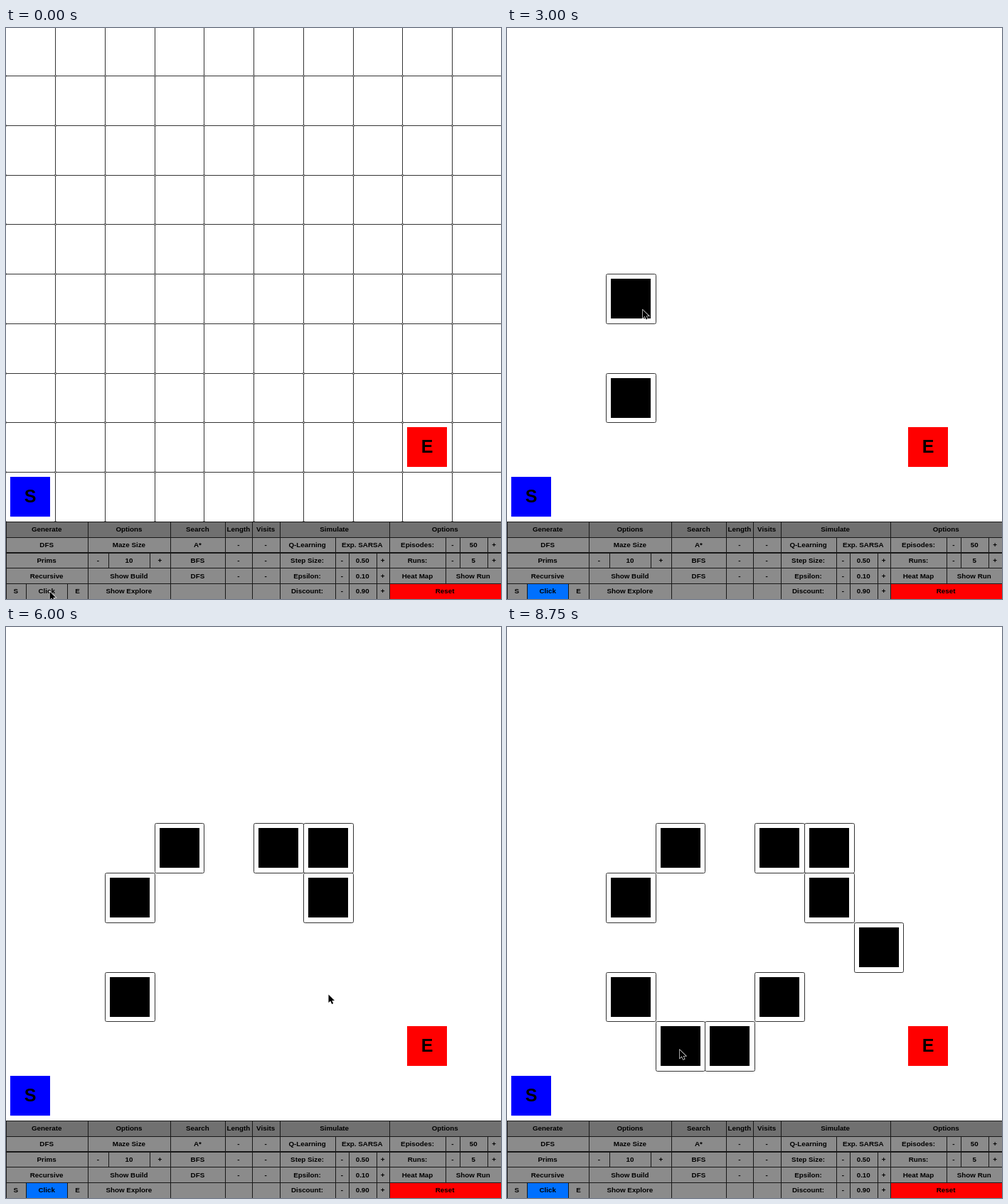
Write an HTML page that moves like this. It is 696x804 px and loops after 9.25 s.

```html
<!DOCTYPE html>
<html lang="en">
<head>
<meta charset="utf-8">
<title>Maze editor</title>
<style>
  html, body { margin: 0; width: 100%; height: 100%; overflow: hidden; background: #fff; }
  svg { display: block; width: 100%; height: 100%; }
  text { font-family: "Liberation Sans", Arial, sans-serif; font-weight: bold; font-kerning: none; text-anchor: middle; }
  .label { font-size: 9.8px; }
  .letter { font-size: 25px; }
</style>
</head>
<body>
<svg id="stage" viewBox="0 0 696 804"></svg>
<script>
const stage = document.getElementById("stage");
const LOOP = 9250, STEP = 250, START = 750;
const SIZE = 10, PITCH = 69.75;
const GREY = "#8b8b8b";

function add(parent, tag, attrs, text) {
  const el = document.createElementNS("http://www.w3.org/2000/svg", tag);
  for (const key in attrs) el.setAttribute(key, attrs[key]);
  if (text) el.textContent = text;
  parent.appendChild(el);
  return el;
}

const show = (el, on) => el.setAttribute("visibility", on ? "visible" : "hidden");
const edgeX = col => Math.floor(col * PITCH - 0.1);
const edgeY = row => Math.floor(row * PITCH - 2.2);

// A box whose one-pixel outline falls on whole pixels
function outline(parent, x, y, right, bottom, attrs) {
  return add(parent, "rect", {
    x: x + 0.5, y: y + 0.5, width: right - x, height: bottom - y, ...attrs
  });
}

function frame(parent, col, row) {
  outline(parent, edgeX(col), edgeY(row), edgeX(col + 1), edgeY(row + 1),
    { rx: 2, fill: "none", stroke: "#333" });
}

function tile(parent, col, row, fill, letter) {
  const x = edgeX(col) + 7, y = edgeY(row) + 7;
  add(parent, "rect", { x, y, width: 56, height: 56, fill });
  if (letter) add(parent, "text", { x: x + 28, y: y + 35.5, class: "letter" }, letter);
}

// Board
const grid = add(stage, "g", {});
for (let i = 0; i < SIZE * SIZE; i++) frame(grid, i % SIZE, Math.floor(i / SIZE));

// Walls: time, column, row
const walls = [
  [2250, 2, 7], [3000, 2, 5], [3750, 3, 4], [4500, 5, 4], [4750, 6, 4],
  [5250, 6, 5], [6250, 7, 6], [6500, 5, 7], [7500, 4, 8], [8750, 3, 8]
].map(([time, col, row]) => {
  const el = add(stage, "g", {});
  frame(el, col, row);
  tile(el, col, row, "#000");
  return { time, el };
});

tile(stage, 0, 9, "#00f", "S");
tile(stage, 8, 8, "#f00", "E");

// Control panel: left edge of each column, then its rows
const columns = [
  [0, "Generate", "DFS", "Prims", "Recursive", "S|Click|E"],
  [115.5, "Options", "Maze Size", "-|10|+", "Show Build", "Show Explore"],
  [231.5, "Search", "A*", "BFS", "DFS", ""],
  [308.5, "Length", "-", "-", "-", ""],
  [346.5, "Visits", "-", "-", "-", ""],
  [385, "Simulate", "Q-Learning|Exp. SARSA", "Step Size:|-|0.50|+", "Epsilon:|-|0.10|+", "Discount:|-|0.90|+"],
  [539.5, "Options", "Episodes:|-|50|+", "Runs:|-|5|+", "Heat Map|Show Run", "Reset"]
];
// Relative cell widths by number of cells in a row
const shares = { 1: [1], 2: [4.05, 3.95], 3: [1, 2, 1], 4: [4.05, 1, 2, 0.95] };
const TOP = 695.4, ROW = 21.8;
let clickButton;

function panelCell(name, x, right, row) {
  const y = TOP + row * ROW;
  const fill = name === "Reset" ? "#f00" : row ? GREY : "#707070";
  const box = outline(stage, Math.floor(x), Math.floor(y), Math.floor(right), Math.floor(y + ROW),
    { fill, stroke: "#181818" });
  if (name === "Click") clickButton = box;
  add(stage, "text", { x: (x + right) / 2 - 0.6, y: y + 13.8, class: "label" }, name);
}

columns.forEach(([left, ...rows], i) => {
  const width = (i + 1 < columns.length ? columns[i + 1][0] : 696) - left;
  rows.forEach((row, r) => {
    const names = row.split("|"), parts = shares[names.length];
    const unit = width / parts.reduce((a, b) => a + b);
    let x = left;
    names.forEach((name, k) => {
      const right = x + parts[k] * unit;
      panelCell(name, x, right, r);
      x = right;
    });
  });
});

// Pointer key points: time, x, y
const path = [
  [START, 60.5, 792], [1250, 59, 791], [1750, 158, 599], [2250, 177, 500], [2500, 177, 500],
  [3000, 190, 395.5], [3750, 255, 311], [4500, 417, 316], [5000, 468.5, 346],
  [5500, 512, 430], [6000, 452.5, 516], [6250, 386, 521], [7250, 299, 574],
  [7500, 291, 591], [8250, 242, 594]
];
const pointer = add(stage, "path", {
  d: "M1 1.6V13L3.7 10.6L5.7 15L7.7 14.1L5.8 9.9H9.5Z",
  fill: "#000", stroke: "#fff", "stroke-width": 1.3, "paint-order": "stroke"
});

function pointerAt(t) {
  const next = path.findIndex(p => p[0] > t);
  if (next < 1) return path.at(next);
  const a = path[next - 1], b = path[next];
  const k = (t - a[0]) / (b[0] - a[0]);
  return a.map((v, i) => v + (b[i] - v) * k);
}

function draw(time) {
  const t = Math.floor((time % LOOP) / STEP) * STEP;
  const active = t >= START;
  show(grid, !active);
  clickButton.setAttribute("fill", active ? "#0070ff" : GREY);
  for (const wall of walls) show(wall.el, t >= wall.time);
  const [, x, y] = pointerAt(t);
  pointer.setAttribute("transform", `translate(${x} ${y})`);
}

const start = performance.now();
function tick() {
  draw(performance.now() - start);
  requestAnimationFrame(tick);
}
tick();
</script>
</body>
</html>
```
